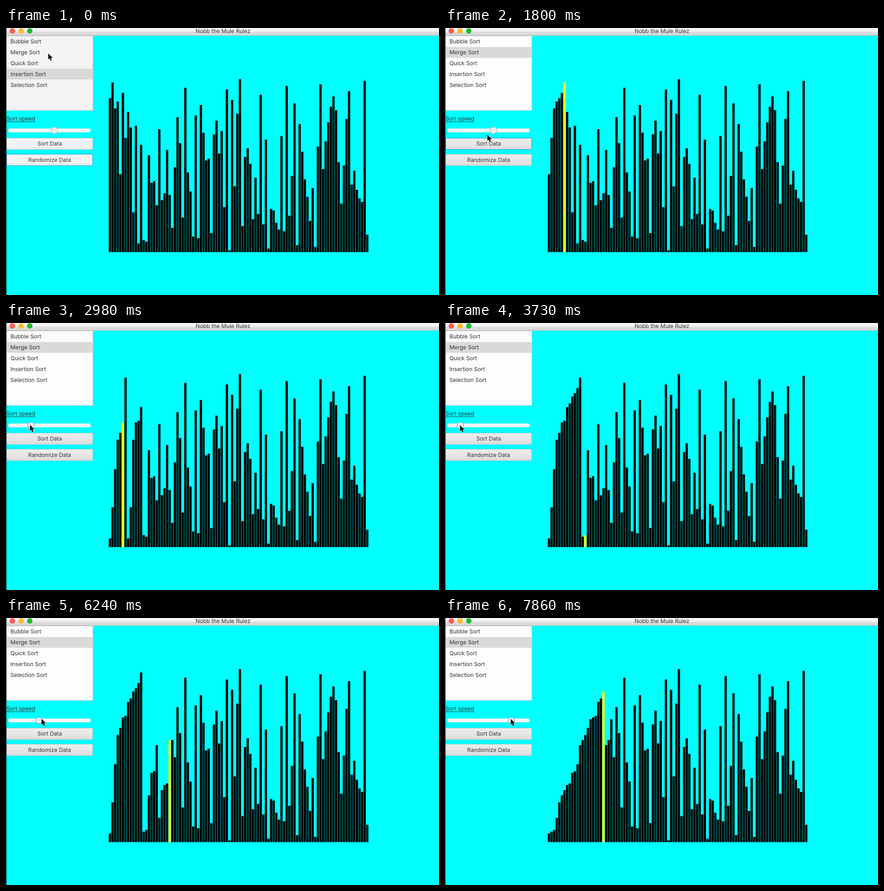
These frames come from a looping animation (952 by 588 pixels, 8000 ms). An HTML page:

```html
<!DOCTYPE html>
<html lang="en">
<head>
<meta charset="utf-8">
<title>Sorting visualizer</title>
<style>
  html, body { margin: 0; width: 100%; height: 100%; overflow: hidden; background: #0ff; }
  svg { display: block; }
  text { font: 12.25px Inter, "Open Sans", sans-serif; fill: #333; }
  .middle { text-anchor: middle; }
</style>
</head>
<body>
<svg width="952" height="588" viewBox="0 0 952 588">
  <defs>
    <linearGradient id="titleBar" x2="0" y2="1">
      <stop offset="0" stop-color="#f7f7f7"/><stop offset=".45" stop-color="#f1f1f1"/>
      <stop offset=".5" stop-color="#dedede"/><stop offset="1" stop-color="#d6d6d6"/>
    </linearGradient>
    <linearGradient id="face" x2="0" y2="1">
      <stop offset="0" stop-color="#ededed"/><stop offset="1" stop-color="#dfdfdf"/>
    </linearGradient>
  </defs>

  <rect width="952" height="588" fill="#0ff"/>
  <g id="bars"></g>

  <rect width="952" height="17" fill="url(#titleBar)"/>
  <rect y="16" width="952" height="1" fill="#b9b9b9"/>
  <circle cx="14" cy="6.5" r="6" fill="#fe5c54"/>
  <circle cx="33.3" cy="6.5" r="6" fill="#fdb92c"/>
  <circle cx="52.3" cy="6.5" r="6" fill="#1dbd2f"/>
  <text class="middle" x="477" y="11">Nobb the Mule Rulez</text>

  <rect id="list" x="1" y="17.5" width="190" height="164" stroke="#c8c8c8"/>
  <rect id="selection" x="1.5" width="189" height="23.8" fill="#d9d9d9"/>
  <g id="items"></g>

  <text x="1" y="204">Sort speed</text>
  <rect x="1" y="206" width="63.5" height="1" fill="#333"/>
  <rect x="5" y="221.5" width="181" height="8" rx="3" fill="#f6f6f6" stroke="#c5dcdc" stroke-width=".7"/>
  <circle id="thumb" cy="225.5" r="7.3" fill="#ececec"/>

  <g id="buttons"></g>
  <rect width="1" height="588" fill="#111"/>
  <path id="cursor" d="M0 0V13.4L3 10.6L5.2 15.8L7.6 14.8L5.4 9.8H9.6Z"
        stroke="#fff" stroke-width="1.2" paint-order="stroke"/>
</svg>

<script>
const LOOP = 8000, TICK = 148.2;   // the picture refreshes once per tick
const ROW = 23.85;
const BASE = 493.5, UNIT = 3.81, PITCH = 5.715;

const start = [
  89, 98, 83, 87, 45, 92, 66, 81, 72, 23, 73, 5, 62, 7, 6, 56, 40, 41, 27, 71,
  30, 34, 59, 33, 14, 49, 78, 63, 20, 95, 46, 35, 9, 79, 8, 85, 69, 53, 54, 11,
  68, 76, 57, 70, 26, 94, 1, 88, 38, 80, 100, 15, 55, 60, 51, 19, 43, 22, 91, 16,
  65, 2, 25, 24, 17, 13, 67, 12, 96, 21, 44, 86, 4, 74, 58, 42, 32, 18, 37, 3,
  61, 97, 48, 64, 75, 84, 90, 82, 52, 28, 50, 77, 93, 39, 47, 36, 31, 29, 99, 10
];

// Keyframes: [tick, value, ...]
const writeKeys = [[5, 0], [6, 1], [7, 4], [16, 33], [22, 46], [25, 51], [30, 59], [32, 62],
  [38, 72], [42, 80], [46, 87], [53, 115]];
const thumbKeys = [[14, 106.5], [16, 97], [22, 34], [38, 34], [42, 73], [46, 114], [50, 145.7]];
const cursorKeys = [[0, 93, 56], [2, 90, 55], [5, 64, 256], [6, 62, 260], [7, 62, 270], [9, 64, 268],
  [13, 103, 224], [14, 104, 223], [16, 92, 223], [22, 33, 225], [38, 33, 225], [42, 78, 222],
  [46, 116, 222], [50, 144.5, 222]];

function sample(keys, tick) {
  if (tick <= keys[0][0]) return keys[0].slice(1);
  const next = keys.findIndex(key => key[0] > tick);
  if (next < 0) return keys.at(-1).slice(1);
  const a = keys[next - 1], b = keys[next];
  const k = (tick - a[0]) / (b[0] - a[0]);
  return a.slice(1).map((v, i) => v + (b[i + 1] - v) * k);
}

// Every array write of a top-down merge sort, in order.
function mergeSortWrites(values) {
  const data = [...values], writes = [];
  (function sort(lo, hi) {
    if (lo >= hi) return;
    const mid = (lo + hi) >> 1;
    sort(lo, mid);
    sort(mid + 1, hi);
    data.slice(lo, hi + 1).sort((a, b) => a - b).forEach((value, i) => {
      data[lo + i] = value;
      writes.push({ index: lo + i, value });
    });
  })(0, data.length - 1);
  return writes;
}

const byId = id => document.getElementById(id);

function setAttributes(node, attributes) {
  for (const name in attributes) node.setAttribute(name, attributes[name]);
}

function add(parent, tag, attributes, text = "") {
  const node = document.createElementNS(parent.namespaceURI, tag);
  setAttributes(node, attributes);
  node.textContent = text;
  return parent.appendChild(node);
}

function addButton(y, label) {
  const group = byId("buttons");
  const face = add(group, "rect", { x: 1.5, y: y + .5, width: 189, height: 25, rx: 2 });
  add(group, "rect", { x: 2.5, y: y + 21.5, width: 187, height: 1, fill: "#d4d4d4" });
  add(group, "text", { x: 96, y: y + 17, class: "middle" }, label);
  return face;
}

const writes = mergeSortWrites(start);
const bars = start.map((_, i) =>
  add(byId("bars"), "rect", { x: 226 + i * PITCH, width: 5 }));
["Bubble", "Merge", "Quick", "Insertion", "Selection"].forEach((name, i) =>
  add(byId("items"), "text", { x: 9.7, y: 34.3 + i * ROW }, name + " Sort"));
const sortButton = addButton(242, "Sort Data");
const randomizeButton = addButton(277.5, "Randomize Data");

function drawBars(count) {
  const values = [...start];
  writes.slice(0, count).forEach(({ index, value }) => values[index] = value);
  const active = count ? writes[count - 1].index : -1;
  bars.forEach((bar, i) => setAttributes(bar, {
    y: BASE - values[i] * UNIT,
    height: values[i] * UNIT,
    fill: i === active ? "#ff0" : "#000"
  }));
}

function drawControls(tick) {
  const picked = tick >= 3;
  const sortFocused = tick >= 5 && tick < 14;
  const border = focused => focused ? "#2492c4" : "#bdbdbd";
  const fill = picked ? "url(#face)" : "#f4f4f4";
  setAttributes(byId("list"), { fill: picked ? "#fdfdfd" : "#f4f4f4" });
  setAttributes(byId("selection"), { y: 18 + ROW * (picked ? 1 : 3) });
  setAttributes(sortButton, { fill, stroke: border(sortFocused) });
  setAttributes(randomizeButton, { fill, stroke: border(!picked) });
  setAttributes(byId("thumb"), {
    cx: sample(thumbKeys, tick)[0],
    stroke: tick >= 14 ? "#4a9fc0" : "#b4b4b4"
  });
  setAttributes(byId("cursor"), { transform: `translate(${sample(cursorKeys, tick)})` });
}

function frame() {
  const tick = Math.min(53, Math.floor(performance.now() % LOOP / TICK));
  drawBars(Math.round(sample(writeKeys, tick)[0]));
  drawControls(tick);
  requestAnimationFrame(frame);
}
frame();
</script>
</body>
</html>
```
